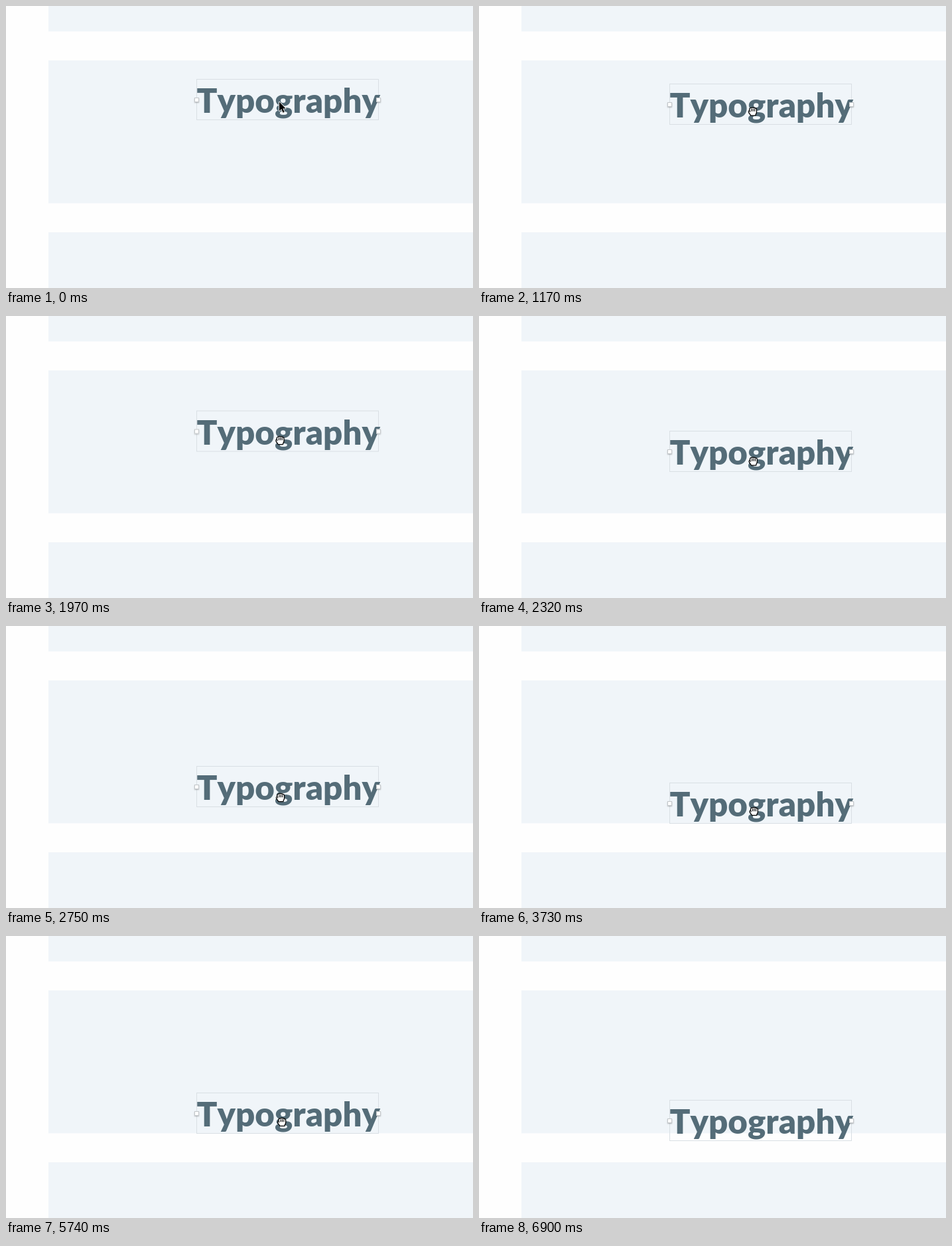
These frames come from a looping animation (704x425 px, 7.26 s). An HTML page with a canvas:

```html
<!DOCTYPE html>
<html lang="en">
<head>
<meta charset="utf-8">
<title>Dragging a headline</title>
<style>
  html, body { margin: 0; width: 100%; height: 100%; overflow: hidden; background: #fefefe; }
  canvas { display: block; width: 704px; height: 425px; }
</style>
</head>
<body>
<canvas id="stage" width="704" height="425"></canvas>
<script>
const ctx = document.getElementById('stage').getContext('2d');
const LOOP = 7260;
const STEP = 87.9;
const GRAB = 990, FASTER = 1960, RELEASE = 6415;
const BOX = { left: 287.5, top: 110.5, width: 274, height: 61 };
const SNAP_TOP = 236.5;
const NUDGE = 11;

const clamp01 = v => Math.min(1, Math.max(0, v));
const progress = (time, from, to) => clamp01((time - from) / (to - from));
const stepped = time => GRAB + Math.floor((time - GRAB) / STEP) * STEP;

// A slow pull that speeds up part of the way.
const pull = (time, from, speed, extra) =>
  Math.max(0, time - from) * speed + Math.max(0, time - FASTER) * extra;

// Past the snap line: down, back up, down again.
function nudge(time) {
  const ease = (from, to) => progress(time, from, to) ** 4;
  return NUDGE * (ease(3370, 3970) - ease(4520, 5120) + ease(5390, 5910));
}

function boxTop(time) {
  const dragged = BOX.top + pull(time, 940, 0.0318, 0.0555);
  const offset = nudge(time);
  const top = Math.min(SNAP_TOP, dragged) + (offset < 4 ? 0 : offset);
  return Math.round(top * 2) / 2;
}

function handPosition(time) {
  const y = Math.min(278, 152.5 + pull(time, GRAB, 0.036, 0.054));
  return [412.3 + (time - GRAB) * 0.0007, y + nudge(time)];
}

function leavingPosition(time) {
  const p = progress(time, 6340, 6870) ** 1.5;
  return [418 + 186 * p, 284 + 144 * p];
}

function drawBands() {
  ctx.fillStyle = '#fefefe';
  ctx.fillRect(0, 0, 704, 425);
  ctx.fillStyle = '#f0f5f9';
  for (let y = -177; y < 425; y += 259) ctx.fillRect(64, y, 640, 215.4);
}

function drawHandle(x, y) {
  ctx.save();
  ctx.shadowColor = 'rgba(0,0,0,.25)';
  ctx.shadowBlur = 2;
  ctx.shadowOffsetY = 1;
  ctx.fillStyle = '#fff';
  ctx.fillRect(x - 3.5, y - 3.5, 7, 7);
  ctx.restore();
  ctx.strokeStyle = '#c3c7ca';
  ctx.strokeRect(x - 3, y - 3, 6, 6);
}

function drawHeadline(top) {
  ctx.lineWidth = 1;
  ctx.strokeStyle = '#d9dfe4';
  ctx.strokeRect(BOX.left, top, BOX.width, BOX.height);
  ctx.fillStyle = '#546c78';
  ctx.font = '900 51px Lato, sans-serif';
  ctx.fontKerning = 'none';
  ctx.fillText('Typography', BOX.left, top + 50.5);
  for (const x of [BOX.left, BOX.left + BOX.width]) drawHandle(x, top + 31);
}

const arrow = new Path2D('M1 1.5V15.2L4.2 12.2L6.6 17.8L8.8 16.8L6.4 11.4H10.6Z');
const fist = new Path2D(
  'M-4 -1V-3.6Q-2.8 -5.4 -1.6 -4.4Q-.4 -6 .8 -4.6Q2.2 -5.6 3.2 -4.2' +
  'Q5.4 -4.6 5.4 -2.4V1.2Q5.2 3 4 4.4V5.6H-2.4Q-3 4 -5 2Q-6.2 -.6 -4 -1Z');
const knuckles = new Path2D('M-1.6 -4V0M.8 -4.2V0M3.2 -4V0M-4 -1V1.2');

function outlined(shape, fill, line, width) {
  ctx.lineJoin = 'round';
  ctx.fillStyle = fill;
  ctx.strokeStyle = line;
  ctx.lineWidth = width;
  ctx.stroke(shape);
  ctx.fill(shape);
}

function drawArrow() {
  outlined(arrow, '#000', '#fff', 1.6);
}

function drawHand() {
  outlined(fist, '#fff', '#000', 2.6);
  ctx.lineWidth = 1.1;
  ctx.stroke(knuckles);
}

function drawAt([x, y], draw) {
  ctx.save();
  ctx.translate(x, y);
  draw();
  ctx.restore();
}

function drawPointer(time, held) {
  if (time < 810) drawAt([411, 143], drawArrow);
  else if (time >= RELEASE) drawAt(leavingPosition(held), drawArrow);
  else if (time >= GRAB) drawAt(handPosition(held), drawHand);
}

function render(time) {
  const held = stepped(time);
  drawBands();
  drawHeadline(boxTop(held));
  drawPointer(time, held);
}

const start = performance.now();
function tick() {
  render((performance.now() - start) % LOOP);
  requestAnimationFrame(tick);
}
tick();
</script>
</body>
</html>
```
